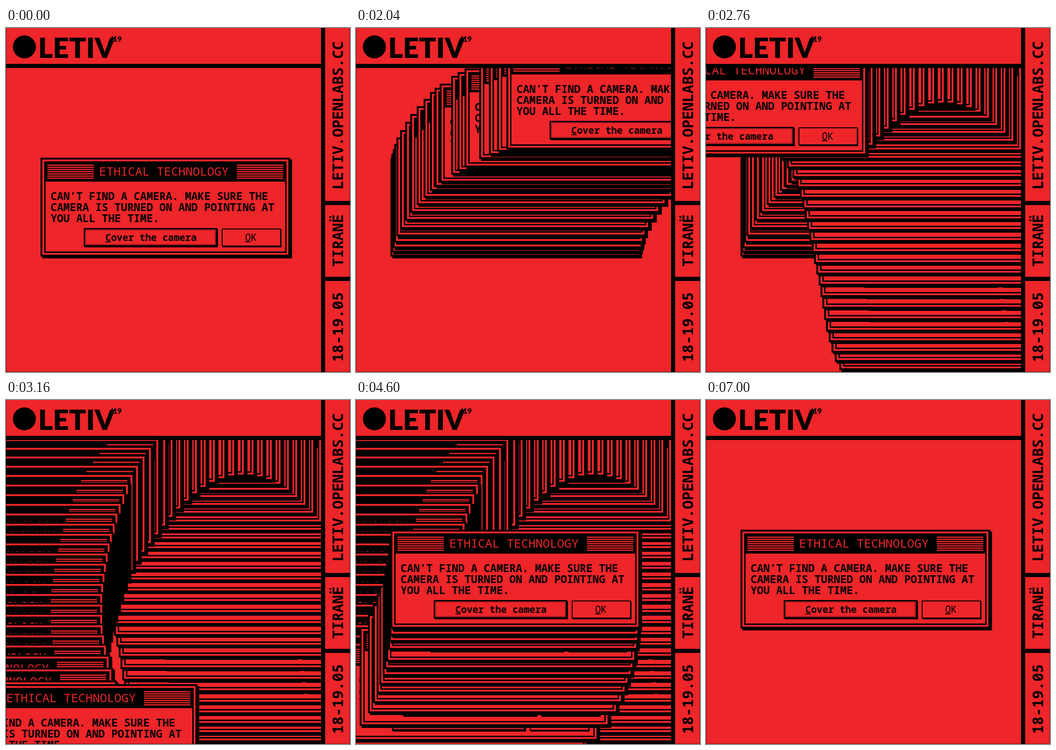
An HTML page with a canvas that plays this animation: 748x748 px, repeating every 7.04 s.

```html
<!DOCTYPE html>
<html lang="en">
<head>
<meta charset="utf-8">
<title>Ethical Technology</title>
<style>
  html, body { margin: 0; width: 100%; height: 100%; overflow: hidden; background: #ee2529; }
  canvas, svg { position: absolute; left: 0; top: 0; width: 748px; height: 748px; }
  .mono { font: 700 31.6px "Noto Sans Mono", "DejaVu Sans Mono", monospace; }
  .name { font: 900 61px Lato, "Open Sans", sans-serif; }
  .year { font: 900 16.5px Lato, "Open Sans", sans-serif; }
</style>
</head>
<body>
<canvas id="stage" width="748" height="748"></canvas>
<svg viewBox="0 0 748 748">
  <path fill="#ee2529" d="M0 0H748V748H685V78H0Z"/>
  <path d="M0 78H685V87H0ZM685 0H694V748H685ZM694 376H748V385H694ZM694 541H748V550H694Z"/>
  <path fill="none" stroke="#000" stroke-opacity=".45" d="M.5 0V747.5H747.5V0"/>
  <circle cx="40" cy="41" r="25"/>
  <text class="name" x="70" y="65">LETIV</text>
  <text class="year" x="229" y="30">’19</text>
  <g class="mono">
    <text transform="translate(732.5 351) rotate(-90)">LETIV.OPENLABS.CC</text>
    <text transform="translate(732.5 519) rotate(-90)">TIRANË</text>
    <text transform="translate(732.5 726) rotate(-90)">18-19.05</text>
  </g>
</svg>
<script>
const RED = '#ee2529', INK = '#000';
const LOOP = 7040, LIFE = 3000, HOME = [75, 282];
const ctx = document.getElementById('stage').getContext('2d');

// Window path: [stamp index, left, top]
const PATH = [
  [0, 75, 282], [2, 79.6, 263.6], [4, 88, 238], [7, 118, 187], [10, 161, 139],
  [12, 182, 121], [13, 207, 104], [15, 236, 88], [16, 268, 70], [19, 327, 49],
  [29, 545, 10], [41, 690, 210], [54, 600, 480], [63, 420, 605], [71, 290, 529],
  [80, 240, 321], [88, 197, 133], [91, 162, 71], [97, 58, -29], [101, -22, -49],
  [105, -105, -22], [110, -193, 62], [116, -274, 180], [125, -325, 374],
  [132, -322, 530], [139, -255, 680], [151, -38, 548], [154, 26, 466],
  [158, 57.5, 385], [160, 66, 354], [161, 70, 328], [164, 75, 282]
];
// Pace: [ms, stamp index]
const PACE = [
  [1240, 0], [1360, 1], [1520, 3], [1600, 4], [1840, 10], [1920, 13], [2040, 19],
  [2280, 37], [2400, 51.5], [2520, 71], [2760, 110], [2840, 121],
  [3080, 143], [3320, 153], [3600, 160], [3840, 163], [4000, 164]
];
const LAST = PATH[PATH.length - 1][0];

function segment(table, v) {
  let i = 0;
  while (i < table.length - 2 && v >= table[i + 1][0]) i++;
  return i;
}

function place(u) {
  const i = segment(PATH, u), a = PATH[i], b = PATH[i + 1];
  const p = PATH[i - 1] || a, n = PATH[i + 2] || b;
  const h = b[0] - a[0], k = (u - a[0]) / h, k2 = k * k, k3 = k2 * k;
  return [1, 2].map(c => {
    const m0 = (b[c] - p[c]) / (b[0] - p[0]) * h;
    const m1 = (n[c] - a[c]) / (n[0] - a[0]) * h;
    return Math.round((2 * k3 - 3 * k2 + 1) * a[c] + (k3 - 2 * k2 + k) * m0 +
      (3 * k2 - 2 * k3) * b[c] + (k3 - k2) * m1);
  });
}

// The picture steps every 40 ms, more slowly at both ends of the move
function hold(t) {
  const step = t >= 3840 ? 160 : t >= 1320 && t < 1520 || t >= 3600 ? 80 : 40;
  return Math.floor(t / step) * step;
}

function progress(ms) {
  const t = hold(ms);
  if (t <= PACE[0][0]) return 0;
  if (t >= 4000) return LAST;
  const i = segment(PACE, t), a = PACE[i], b = PACE[i + 1];
  return a[1] + (b[1] - a[1]) * (t - a[0]) / (b[0] - a[0]);
}

function makeWindow() {
  const c = document.createElement('canvas');
  c.width = 547;
  c.height = 219;
  const g = c.getContext('2d');
  g.translate(-HOME[0], -HOME[1]);
  const box = (color, x, y, r, b) => {
    g.fillStyle = color;
    g.fillRect(x, y, r - x, b - y);
  };
  const frame = (x, y, r, b, w) => {
    box(INK, x, y, r, b);
    box(RED, x + w, y + w, r - w, b - w);
  };
  const text = (s, x, y, size, weight, color = INK) => {
    g.font = `${weight} ${size}px "Noto Sans Mono", "DejaVu Sans Mono", monospace`;
    g.fillStyle = color;
    g.fillText(s, x, y);
  };

  box(INK, 79, 286, 622, 501);
  frame(75, 282, 618, 497, 4);
  frame(83, 290, 610, 489, 3);
  box(INK, 83, 290, 610, 334);
  for (let i = 0; i < 7; i++) {
    const y = 297 + i * 4.75;
    box(RED, 90, y, 191, y + 2.6);
    box(RED, 502, y, 603, y + 2.6);
  }
  text('ETHICAL TECHNOLOGY', 202.5, 321, 26.1, 500, RED);
  ['CAN’T FIND A CAMERA. MAKE SURE THE',
    'CAMERA IS TURNED ON AND POINTING AT',
    'YOU ALL THE TIME.'].forEach((s, i) => text(s, 97, 373.5 + i * 24, 23.2, 600));

  box(INK, 171, 437, 461, 477);
  frame(169, 435, 459, 475, 3);
  g.strokeStyle = INK;
  g.lineWidth = 1;
  g.setLineDash([1, 1]);
  g.strokeRect(173.5, 439.5, 281, 31);
  text('Cover the camera', 216, 462.5, 20.7, 700);
  box(INK, 216, 464, 228, 466);

  box(INK, 471, 438, 599, 477);
  frame(469, 436, 598, 475, 2);
  text('OK', 520, 463, 20.9, 400);
  box(INK, 520, 464, 532, 466);
  return c;
}

const win = makeWindow();
const stamps = Array.from({ length: LAST + 1 }, (_, i) => place(i));

function draw(ms) {
  const t = Math.floor(ms % LOOP / 40) * 40;
  const head = progress(t), tail = progress(t - LIFE);
  ctx.fillStyle = RED;
  ctx.fillRect(0, 0, 748, 748);
  for (let i = Math.ceil(tail); i <= head; i++) ctx.drawImage(win, ...stamps[i]);
  ctx.drawImage(win, ...place(head));
}

const start = performance.now();
function tick() {
  draw(performance.now() - start);
  requestAnimationFrame(tick);
}
tick();
</script>
</body>
</html>
```
